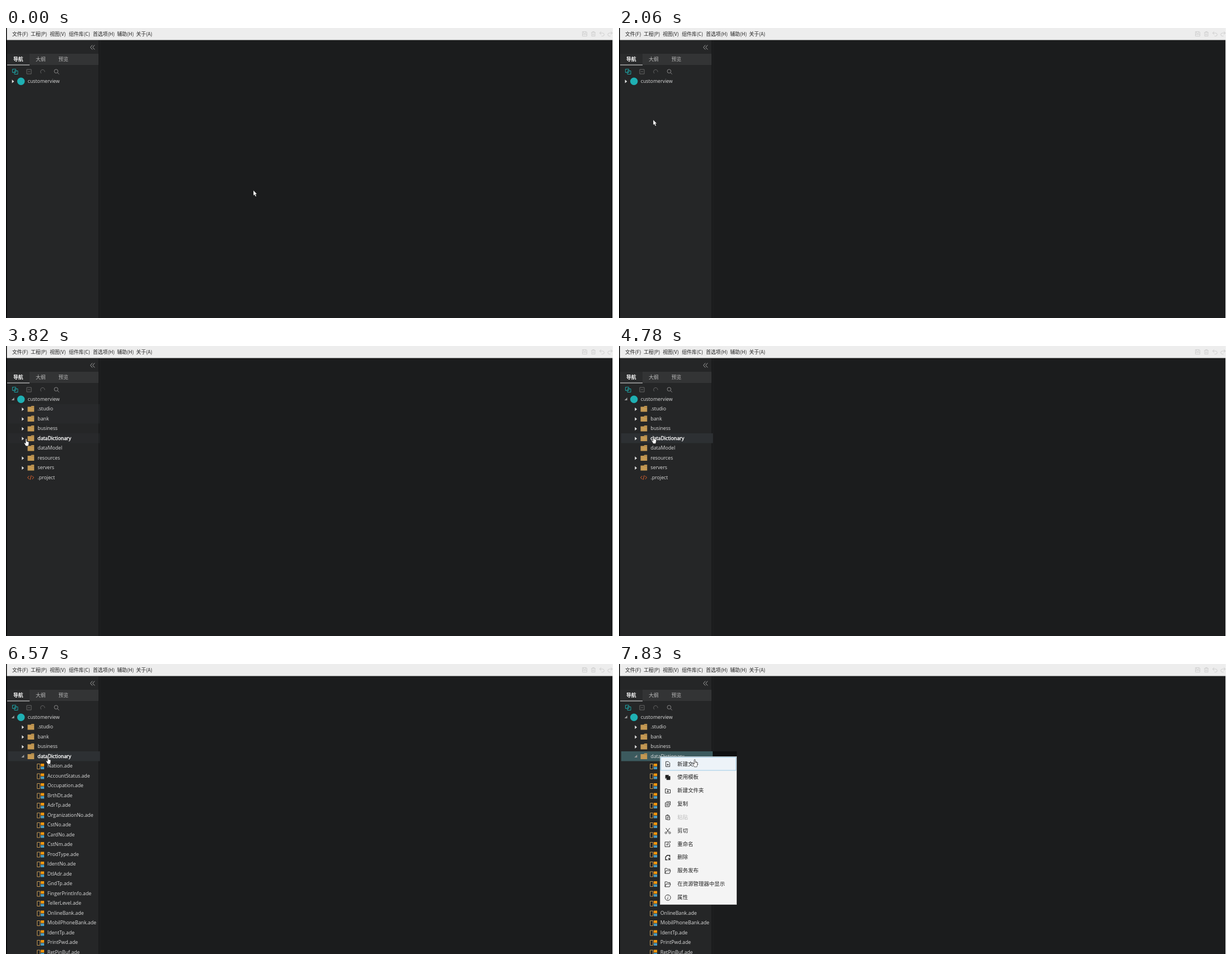
These frames come from a looping animation (1082x518 px, 7990 ms). An HTML page:

```html
<!DOCTYPE html>
<html lang="zh">
<head>
<meta charset="utf-8">
<style>
html, body { margin: 0; width: 100%; height: 100%; overflow: hidden; background: #1b1c1d; }
svg { display: block; width: 100%; height: 100%; }
text { font: 8.75px "Open Sans", "Noto Sans", sans-serif; fill: #dcdcdc; white-space: pre; }
.zh { font: 8.8px "Noto Sans CJK SC", "Noto Sans CJK", sans-serif; fill: #222; }
.tab { fill: #b9b9b9; }
.tab.on { fill: #fff; font-weight: bold; }
.menu { font-size: 9.45px; }
.off { fill: #bdbdbd; }
.hot text { fill: #fff; stroke: #fff; stroke-width: .35px; }
.line { fill: none; stroke-width: 1; }
</style>
</head>
<body>
<svg viewBox="0 0 1082 518" preserveAspectRatio="none">
  <defs>
    <clipPath id="treeClip"><rect id="treeWindow" x="0" y="103.5" width="168" height="0"/></clipPath>
    <clipPath id="filesClip"><rect id="filesWindow" x="0" y="173.5" width="168" height="0"/></clipPath>
  </defs>

  <rect width="1082" height="518" fill="#1b1c1d"/>
  <rect y="22" width="165" height="496" fill="#252627"/>
  <rect x="165" y="22" width="1.5" height="496" fill="#151617"/>
  <rect x="166.5" y="22" width="1" height="496" fill="#242526"/>
  <rect x="42" y="46" width="123" height="20" fill="#333435"/>
  <rect x="2" y="46" width="40" height="20" fill="#2a2b2c"/>
  <rect x="2" y="65.5" width="40" height="1" fill="#e8e8e8"/>
  <rect width="1082" height="21.5" fill="#ededed"/>
  <rect width="1.5" height="518" fill="#000"/>
  <rect x="1081" width="1" height="518" fill="#f4f4f4"/>
  <g id="labels"></g>

  <g class="line" stroke="#cfcfcf">
    <path d="M1027.5 6.5h7l1 1v7h-8zM1029.5 6.5v3h4v-3M1027.5 11.5h8"/>
    <path d="M1043 8h8M1045.500 8v-1.500h3v1.500M1044 8v6.500h6v-6.500M1046 10v3M1048 10v3"/>
    <path d="M1061 6.500l-3 2.500 3 2.500M1058 9h5.500a2.700 2.700 0 0 1 0 5.500h-2"/>
    <path d="M1078 6.500l3 2.500-3 2.500M1081 9h-5.500a2.700 2.700 0 0 0 0 5.500h2"/>
  </g>
  <path class="line" stroke="#a8a8a8" d="M154 30.500l-3.500 4 3.500 4M158 30.500l-3.500 4 3.500 4"/>
  <path class="line" stroke="#1fa3a5" d="M11.500 73.500h6v6h-6zM15 76.500h6v6h-6z"/>
  <g class="line" stroke="#666">
    <path d="M37 74h8v8h-8zM39 78h4"/>
    <path d="M63 81a3.700 3.700 0 1 1 6-2.500"/>
    <path stroke="#8a8a8a" d="M86 77.200a3.300 3.300 0 1 1 6.600 0a3.300 3.300 0 1 1-6.600 0M91.700 79.600l3 3"/>
  </g>

  <g id="root"></g>
  <g clip-path="url(#treeClip)">
    <g id="upper"></g>
    <g id="files" clip-path="url(#filesClip)"></g>
    <g id="lower"></g>
  </g>

  <g id="popup">
    <rect x="167" y="156" width="43" height="10" fill="#0f1011"/>
    <rect x="73.5" y="165.500" width="136" height="264" fill="#f4f4f4" stroke="#c9c9c9"/>
    <rect x="74.500" y="166.500" width="134" height="23.500" fill="#edf3f8" stroke="#9ccbe6"/>
    <g id="actions"></g>
  </g>

  <path id="arrow" fill="#fff" stroke="#111" stroke-width=".3" d="M0 0v9.300l2-1.900 1.700 3.600 1.600-.8-1.700-3.500h2.800z"/>
  <path id="hand" fill="#fff" stroke="#222" stroke-width=".7" d="M3 1.200q1-1.500 2 0v4.200l3 .8q1 .3.900 1.500l-.5 3.700-.8 2.400H3.400L.4 8.800q-.3-1.300.9-1.100L3 9z"/>
</svg>

<script>
const LOOP = 7990, ROW = 17.5, TOP = 86;
const MENU_OPEN = 7130;
const $ = id => document.getElementById(id);
const label = (x, y, str, cls) => `<text x="${x}" y="${y}" class="${cls || ''}">${str}</text>`;

// Menu bar and tabs
$('labels').innerHTML =
  [[11, '文件(F)'], [44, '工程(P)'], [78, '视图(V)'], [112, '组件库(C)'], [155, '首选项(H)'], [198, '辅助(H)'], [232, '关于(A)']]
    .map(([x, s]) => label(x, 14.3, s, 'zh')).join('') +
  [[13, '导航'], [53, '大纲'], [93.5, '预览']]
    .map(([x, s], i) => label(x, 58.8, s, i ? 'zh tab' : 'zh tab on')).join('');

// Project tree; icons are drawn around the row centre
const folder = '<path fill="#c39853" d="M38.500-3.500h5.500l1.500-1.500h4.700v10.500H38.500z"/><path stroke="#8d6c38" stroke-width=".6" d="M44.500-2.800h5.500"/>';
const code = '<path class="line" stroke="#e5652f" stroke-width="1.200" d="M41.500-2.500l-3 3 3 3M46.500-2.500l3 3-3 3M45-3.500l-2 8"/>';
const project = '<circle cx="26.700" cy=".8" r="6.700" fill="#1fb0b3"/>';
const dataFile = '<path class="line" stroke="#c39853" stroke-width="1.200" d="M55.600-3.500h5v9h-5z"/>' +
  '<path fill="#f1970f" d="M62-4h6v4.800h-6z"/><path fill="#4a9bc2" d="M62 1.500h6v4.500h-6z"/>';
const closed = x => `<path class="closed" fill="#e2e2e2" d="M${x} -2.300v6.400l3.700-3.200z"/>`;
const opened = x => `<path class="opened" fill="#999" d="M${x + 4} -2.500v5h-5z"/>`;

const row = (index, name, x, icon) =>
  `<g class="row" transform="translate(0 ${TOP + 8.5 + ROW * index})">` +
  `<rect x="4" y="-8.500" width="163.500" height="${ROW}" fill="#2d3033" opacity="0"/>${icon}${label(x, 3.4, name)}</g>`;

const names = ['.studio', 'bank', 'business', 'dataDictionary', 'dataModel', 'resources', 'servers', '.project'];
const entries = names.map((name, i) => {
  const arrows = name === 'dataModel' || name === '.project' ? '' :
    closed(28.3) + (name === 'dataDictionary' ? opened(28.3) : '');
  return row(i + 1, name, 56.3, arrows + (name === '.project' ? code : folder));
});
$('root').innerHTML = row(0, 'customerview', 38.8, closed(10.7) + opened(10.7) + project);
$('upper').innerHTML = entries.slice(0, 4).join('');
$('lower').innerHTML = entries.slice(4).join('');
$('files').innerHTML = ('Nation AccountStatus Occupation BrthDt AdrTp OrganizationNo CstNo CardNo CstNm ProdType ' +
  'IdentNo DtlAdr GndTp FingerPrintInfo TellerLevel OnlineBank MobilPhoneBank IdentTp PrintPwd RetPinBuf')
  .split(' ').map((name, i) => row(i + 5, name + '.ade', 73.8, dataFile).replace('class="row"', '')).join('');

// Context menu
const openFolder = 'M-5 4.500v-9h3.500l1 1.500h4.500v2.500M-5 4.500l2-5h8l-2 5z';
const actions = [
  ['新建文件', 'M-3.500-4.500h4.500l2.500 2.500v6.500h-7zM-1.800 1h3.600M0-.8v3.600'],
  ['使用模板', 'M-4 2v-6h6M-2-2h6v6h-6z'],
  ['新建文件夹', 'M-4.500-3.500h3l1 1.500h5v6h-9zM-2 1h4M0-1v4'],
  ['复制', 'M-2.500-4.500h7v6.500M-4.500-2.500h7v7h-7zM-3 0h4M-3 2h4'],
  ['粘贴', 'M-1.500 3.500h-2v-7h6v2M-2-4.500h3M-1-1h4.500v5h-4.500zM.500 1.500h1.500'],
  ['剪切', 'M-3.500-5L2 2.500M3.500-5L-2 2.500M-5 3.500a1.600 1.600 0 1 0 3.200 0a1.600 1.600 0 1 0-3.200 0M1.800 3.500a1.600 1.600 0 1 0 3.200 0a1.600 1.600 0 1 0-3.200 0'],
  ['重命名', 'M1-4h-6v8.500h8.500v-4.500M-2 1.500l.5-2 5-5 1.500 1.500-5 5z'],
  ['删除', 'M-.500 4h-3.500v-5l3-3h4.500v3.500M1 1l3.500 3.500M4.500 1l-3.500 3.500'],
  ['服务发布', openFolder],
  ['在资源管理器中显示', openFolder],
  ['属性', 'M-5 0a5 5 0 1 0 10 0a5 5 0 1 0-10 0M.700-3l-.2 1M.300-.5l-.7 3.500']
];
$('actions').innerHTML = actions.map(([name, icon], i) => {
  const y = 178.3 + 23.85 * i;
  const fill = i === 1 ? '#222' : 'none';
  return `<path transform="translate(87 ${y + .5})" d="${icon}" fill="${fill}" stroke="#222" stroke-width="${i === 7 ? 1.4 : .9}"/>` +
    label(104, y + 3.2, name, 'zh menu' + (i === 4 ? ' off' : ''));
}).join('');

// Pointer moves: first step, last step, number of steps, destination
const START = [441, 290];
const MOVES = [
  [430, 1380, 8, 144, 217],
  [2060, 2060, 1, 61, 164],
  [2200, 2600, 4, 7, 98],
  [3430, 3820, 4, 32, 165],
  [3960, 4360, 4, 74, 160],
  [4510, 5200, 6, 25, 162],
  [5860, 6570, 6, 71, 165],
  [7560, 7830, 3, 131, 170]
];

function pointer(t) {
  let [x, y] = START;
  for (const [first, last, steps, toX, toY] of MOVES) {
    if (t < first) break;
    const gap = (last - first) / (steps - 1) || 1;
    const part = Math.min(steps, Math.floor((t - first) / gap + .02) + 1) / steps;
    x += (toX - x) * part;
    y += (toY - y) * part;
  }
  return [x, y];
}

// Eased unfolding over 200 ms, seen every 140 ms
function unfold(t, start, lead) {
  if (t < start) return 0;
  const p = Math.min(1, (lead + 140 * Math.floor((t - start) / 140)) / 200);
  return .5 - Math.cos(Math.PI * p) / 2;
}

function hoveredRow(t) {
  const [x, y] = pointer(t);
  const index = Math.floor((y - TOP) / ROW);
  const count = t < 3010 ? 1 : 9;
  return t < MENU_OPEN && x < 167 && index >= 0 && index < count ? index : -1;
}

const rows = [...document.querySelectorAll('.row')];
const show = (el, on) => el.setAttribute('visibility', on ? 'visible' : 'hidden');

function setOpen(rowEl, on) {
  show(rowEl.querySelector('.closed'), !on);
  show(rowEl.querySelector('.opened'), on);
}

function draw(t) {
  const treeHeight = 8 * ROW * unfold(t, 3010, 59);
  const filesHeight = 24 * ROW * unfold(t, 5720, 6);
  $('treeWindow').setAttribute('height', treeHeight + filesHeight);
  $('filesWindow').setAttribute('height', filesHeight);
  $('lower').setAttribute('transform', `translate(0 ${filesHeight})`);
  setOpen(rows[0], t >= 3010);
  setOpen(rows[4], t >= 5720);

  // Row highlight fades over the last three steps
  const recent = [0, 135, 270].map(ago => hoveredRow(Math.max(0, t - ago)));
  const menu = t >= MENU_OPEN;
  rows.forEach((el, i) => {
    const picked = menu && i === 4;
    const back = el.firstChild;
    el.classList.toggle('hot', recent[0] === i);
    back.setAttribute('fill', picked ? '#3c5a5e' : '#2d3033');
    back.setAttribute('opacity', picked ? 1 : recent.filter(r => r === i).length / 3);
  });
  show($('popup'), menu);

  const [x, y] = pointer(t);
  const pointing = menu || recent[0] >= 0;
  for (const id of ['arrow', 'hand']) {
    $(id).setAttribute('transform', `translate(${x} ${y})`);
    show($(id), pointing === (id === 'hand'));
  }
}

const began = performance.now();
function tick() {
  draw((performance.now() - began) % LOOP);
  requestAnimationFrame(tick);
}
tick();
</script>
</body>
</html>
```
